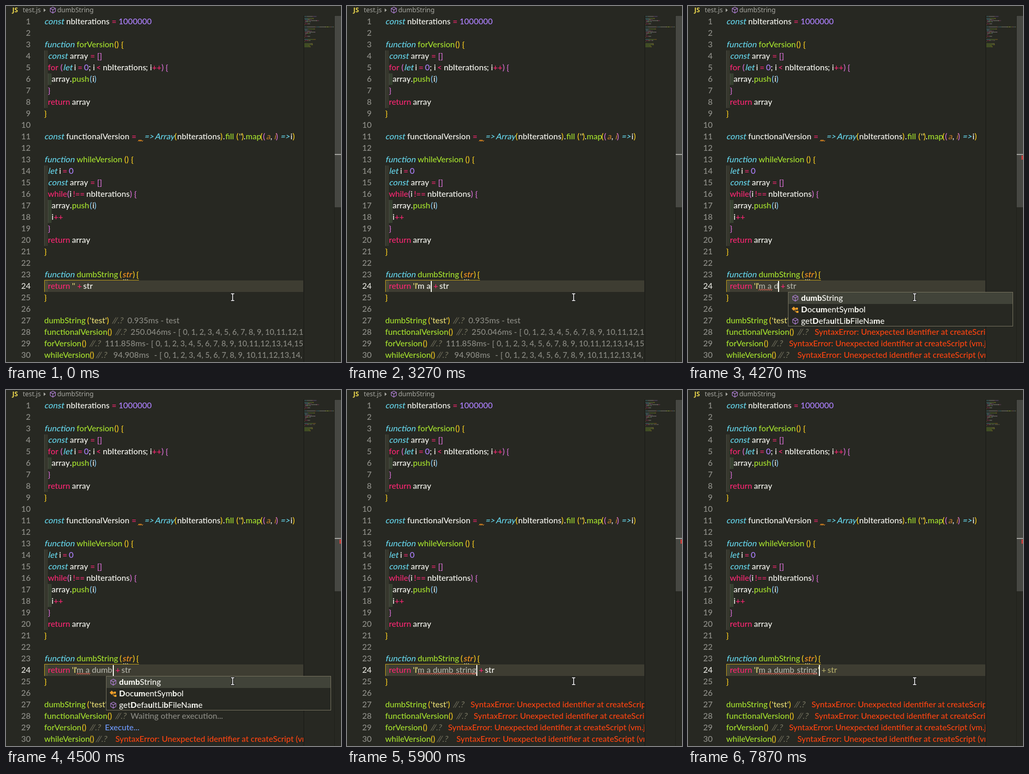
Recreate the animation shown at these times as an HTML page. Size 640 px wide and 681 px high, loop 8000 ms.

```html
<!DOCTYPE html>
<html lang="en">
<head>
<meta charset="utf-8">
<title>Code editor</title>
<style>
html, body { margin: 0; width: 100%; height: 100%; overflow: hidden; background: #272822; }
svg { display: block; width: 640px; height: 681px; }
text { font: 500 15.6px Lato, "Open Sans", sans-serif; white-space: pre; fill: #f8f8f2; }
.crumb { font: 12.4px "Noto Sans", "Open Sans", sans-serif; fill: #a9a9a3; }
.num { text-anchor: end; fill: #90908a; }
.now { fill: #e4e4de; }
.w { fill: #f8f8f2; }
.k { fill: #f92672; }
.c { fill: #66d9ef; }
.f { fill: #a6e22e; }
.n { fill: #ae81ff; }
.s { fill: #e6db74; }
.a { fill: #fd971f; }
.d { fill: #b9792a; }
.y { fill: #ffd21f; }
.o { fill: #da70d6; }
.b { fill: #87cefa; }
.g { fill: #74725f; }
.dim { fill: #b4b4ab; }
.rose { fill: #b52c5c; }
.tan { fill: #b3ac68; }
.time { fill: #8b8b84; }
.items { fill: #8b8b84; font-size: 15px; }
.run { fill: #6f9bff; }
.fail { fill: #ff4410; }
.pop tspan { font-weight: 800; }
</style>
</head>
<body>
<svg viewBox="0 0 640 681" xmlns="http://www.w3.org/2000/svg">
  <defs><clipPath id="pane"><rect width="569.5" height="681"/></clipPath></defs>
  <rect width="640" height="681" fill="#272822"/>

  <text class="crumb" x="12" y="12" style="font-weight:700;fill:#e8d44d">JS</text>
  <text class="crumb" x="32" y="12">test.js</text>
  <path d="M72 4.5 L76 8 L72 11.5Z" fill="#a9a9a3"/>
  <g id="cube" fill="none" stroke="#b180d7" stroke-width="1.1">
    <path d="M89.5 2 L94.5 4.5 V10.5 L89.5 13.5 L84.5 10.5 V4.5Z M84.5 4.5 L89.5 7.3 L94.5 4.5 M89.5 7.3 V13.5"/>
  </g>
  <text class="crumb" x="98" y="12">dumbString</text>

  <g clip-path="url(#pane)">
    <rect x="73" y="525" width="497" height="22" fill="#3e3d32"/>
    <g id="indent"></g>
    <path d="M254 524.5 H73.5 V547" fill="none" stroke="#b99a1c"/>
    <g id="code"></g>
    <path d="M252 259 l2 -2 2 2 2 -2 2 2 2 -2" fill="none" stroke="#fd971f"/>
    <path d="M224 523.5 H234" stroke="#c9c9c0" stroke-width="1.4" stroke-dasharray="1.5 2.2"/>
    <g id="out"></g>
    <g id="edit"></g>
    <path id="wave" fill="none" stroke="#ff6a5c"/>
    <rect id="caret" y="526" width="2" height="21" fill="#f8f8f0"/>
  </g>

  <rect x="568" y="18" width="2" height="663" fill="#1f201b"/>
  <g id="map" opacity=".4"></g>
  <g id="mapEdit" opacity=".4"></g>
  <rect x="627" y="18" width="1" height="663" fill="#1f201b"/>
  <rect x="628" y="19" width="12" height="366" fill="#474843"/>
  <rect x="628" y="283" width="12" height="2" fill="#a3a39e"/>
  <rect id="mark" x="637" y="286" width="3" height="8" fill="#c5403c"/>

  <g id="pop" class="pop">
    <rect x="191.5" y="547.5" width="429" height="65" fill="#272822" stroke="#75715e"/>
    <rect x="192" y="548" width="428" height="22" fill="#414339"/>
    <use href="#cube" x="115.5" y="551"/>
    <g fill="#ee9d28">
      <path d="M198 579 l4 -4 4 4 -4 4z M206 577 h4 v4 h-4z M207 583 h4 v4 h-4z"/>
      <path d="M204 579 h4 M205 580 v5 h4" stroke="#ee9d28" fill="none"/>
    </g>
    <use href="#cube" x="115.5" y="595"/>
    <text x="216" y="564"><tspan>dumb</tspan>String</text>
    <text x="216" y="586"><tspan>D</tspan>oc<tspan>um</tspan>entSym<tspan>b</tspan>ol</text>
    <text x="216" y="608">get<tspan>D</tspan>efa<tspan>u</tspan>ltLi<tspan>b</tspan>FileNa<tspan>m</tspan>e</text>
  </g>

  <g fill="none" stroke-linecap="square">
    <path d="M430.5 550.5 H435.5 M433 551 V563 M430.5 563.5 H435.5" stroke="#111" stroke-width="3.4"/>
    <path d="M430.5 550.5 H435.5 M433 551 V563 M430.5 563.5 H435.5" stroke="#fff" stroke-width="1.5"/>
  </g>
</svg>
<script>
const $ = id => document.getElementById(id);
const base = line => 22 * line + 13;
const esc = s => s.replace(/&/g, '&amp;').replace(/</g, '&lt;');
// Slanted classes lean the upright letters
const slant = cls => 'cadg'.includes(cls) ? ' skewX(-12)' : '';
const txt = (x, line, cls, s) =>
  `<text transform="translate(${x} ${base(line)})${slant(cls)}" class="${cls}">${esc(s)}</text>`;
const rect = (x, y, w, h, attr) => `<rect x="${x}" y="${y}" width="${w}" height="${h}" ${attr}/>`;
const mini = (x, line, cls, s) =>
  rect(570 + (x - 73) * 0.117, 17.5 + 2 * line, s.length * 0.95, 1, `class="${cls}"`);

// Each token: x, class, text
const push = '87 w array|122 w .|126 f push|160 b (|165 w i|168.5 b )';
const list = '80 c const|122 w array|161 k =|174 o []';
const back = '80 k return|126 w array';
const code = {
  1: '73 c const|115 w nbIterations|202 k =|215 n 1000000',
  3: '73 c function|135 f forVersion|207 y ()|220 y {',
  4: list,
  5: '80 k for|104 o (|109 c let|130 w i|137 k =|149 n 0|158 w ;|166 w i|172.5 k <|185 w nbIterations|267 w ;|275 w i|279 k ++|297 o )|305 o {',
  6: push,
  7: '80 o }',
  8: back,
  9: '73 y }',
  11: '73 c const|115 w functionalVersion|240 k =|253 a _|264 c =>|284 c Array|322 y (|327 w nbIterations|409.5 y )|414.5 w .|419 f fill|440 y (|445 s \'\'|450 y )|454 w .|458 f map|486 y (|491 o (|497 d a|505 w ,|512 d i|515.5 o )|524 c =>|543.5 w i|547.5 y )',
  13: '73 c function|135 f whileVersion|226 y ()|239 y {',
  14: '80 c let|101.5 w i|108 k =|120 n 0',
  15: list,
  16: '80 k while|117 o (|121.5 w i|128 k !==|153.5 w nbIterations|236.5 o )|245 o {',
  17: push,
  18: '87 w i|91 k ++',
  19: '80 o }',
  20: back,
  21: '73 y }',
  23: '73 c function|135 f dumbString|217 y (|222 a str|242 y )|249 y {',
  24: '80 k return',
  25: '73 y }',
  27: '73 f dumbString|155 y (|160 s \'test\'|192.5 y )|202 g //.?',
  28: '73 f functionalVersion|194 y ()|208 g //.?',
  29: '73 f forVersion|145 y ()|159 g //.?',
  30: '73 f whileVersion|160 y ()|171 g //.?'
};

let lines = '', map = '';
for (let n = 1; n <= 30; n++) {
  lines += `<text x="47" y="${base(n)}" class="num${n === 24 ? ' now' : ''}">${n}</text>`;
  for (const part of (code[n] || '').split('|').filter(Boolean)) {
    const [x, cls, s] = part.split(' ');
    lines += txt(+x, n, cls, s);
    if (cls !== 'g') map += mini(+x, n, cls, s);
  }
}
$('code').innerHTML = lines;
$('map').innerHTML = map;

const shade = (x, from, to, fill) => {
  const y = 22 * from - 3, h = 22 * (to - from + 1);
  return rect(x, y, 7, h, `fill="${fill}"`) + rect(x, y, 1, h, 'fill="#494a42"');
};
$('indent').innerHTML = shade(73, 4, 8, '#36372d') + shade(73, 14, 20, '#36372d') +
  shade(73, 24, 24, '#4a4935') + shade(80, 6, 6, '#364030') + shade(80, 17, 18, '#364030');

// Typing: time, literal, right edge
const typed = [
  [0, "''", 132], [1800, "'I'", 135.5], [2500, "'I'm", 148], [2770, "'I'm ", 152],
  [3270, "'I'm a", 161], [3370, "'I'm a ", 164], [4270, "'I'm a d", 173],
  [4330, "'I'm a du", 182], [4400, "'I'm a dum", 196], [4500, "'I'm a dumb", 205],
  [4900, "'I'm a dumb ", 209], [5230, "'I'm a dumb s", 216], [5500, "'I'm a dumb st", 221],
  [5570, "'I'm a dumb str", 227], [5670, "'I'm a dumb stri", 231], [5770, "'I'm a dumb strin", 240],
  [5900, "'I'm a dumb string", 248], [6070, "'I'm a dumb string ", 252],
  [6870, "'I'm a dumb string", 248], [7670, "'I'm a dumb string'", 251]
];
// Results: v value, E executing, w waiting, x failed
const runs = [
  [0, 'vvvv'], [3430, 'Ewww'], [3570, 'xwwE'], [3630, 'xwEx'], [3700, 'xExx'], [3830, 'xxxx'],
  [4500, 'xwEx'], [4600, 'xExx'], [4700, 'xxxx'],
  [6400, 'Ewww'], [6670, 'xEww'], [6730, 'xxEw'], [6800, 'xxxE'], [6870, 'xxxx']
];
const tails = [
  [0, 'k', 'w'], [3570, 'rose', 'w'], [4270, 'k', 'dim'], [5230, 'k', 'w'],
  [6400, 'rose', 'dim'], [7670, 'tan', 'tan']
];
const waves = [[0, 135], [3570, 148], [4270, 161], [4900, 204], [5900, 248]];
const carets = [
  [0, 0], [30, 1], [570, 0], [1300, 1], [1570, 0], [2270, 1], [6500, 0], [6870, 1]
];
const at = (table, t) => table.filter(row => row[0] <= t).pop();

const edge = [232, 238, 189, 205];
const took = ['0.935ms - test', '250.046ms', '111.858ms', '94.908ms'];
const first = [0, 338, 286, 302];
const fail = 'SyntaxError: Unexpected identifier at createScript (vm.js:80:10)';

function value(i) {
  const line = 27 + i, x = first[i];
  let s = txt(edge[i], line, 'time', took[i]);
  if (!x) return s;
  s += txt(x - 19, line, 'time', '-') + txt(x - 9, line, 'time', '[');
  for (let k = 0; k < 17; k++) {
    s += txt(x + Math.min(k, 10) * 15.7 + Math.max(k - 10, 0) * 21.5, line, 'items', k + ',');
  }
  return s;
}
function result(kind, i) {
  if (kind === 'v') return value(i);
  if (kind === 'E') return txt(edge[i], 27 + i, 'run', 'Execute...');
  if (kind === 'w') return txt(edge[i], 27 + i, 'time', 'Waiting other execution...');
  return txt(edge[i] + 4, 27 + i, 'fail', fail);
}

function literal(t) {
  const [, s, end] = at(typed, t);
  const [, plus, name] = at(tails, t);
  const parts = [[126, 's', "'"]];
  if (s.length < 3) parts.push([129, 's', "'"]);
  else parts.push([129.2, 's', 'I'], [132.5, 's', "'"]);
  const spots = [135, 152, 164, 208];
  const closed = s.endsWith("g'");
  const body = s.slice(3, closed ? -1 : undefined);
  const tone = t < 3570 ? 'w' : 'dim';
  body.split(' ').forEach((word, i) => {
    if (!word) return;
    if (i === 3 && t < 5900) {
      parts.push([208, tone, 's']);
      if (word.length > 1) parts.push([215.3, 'w', word.slice(1)]);
    } else parts.push([spots[i], tone, word]);
  });
  if (closed) parts.push([248, 's', "'"]);
  parts.push([end + 4, plus, '+'], [end + 15.5, name, 'str']);
  return parts;
}

function wave(t) {
  const end = at(waves, t)[1];
  let d = 'M135 544';
  for (let x = 137, up = 1; x <= end; x += 2, up = !up) d += ` L${x} ${up ? 541.5 : 544}`;
  return end > 135 ? d : '';
}

let shown = -1;
function draw(t) {
  // Every change falls on a 10 ms step
  const step = Math.floor(t / 10);
  if (step === shown) return;
  shown = step;
  const parts = literal(t);
  $('edit').innerHTML = parts.map(([x, cls, s]) => txt(x, 24, cls, s)).join('');
  $('mapEdit').innerHTML = parts.map(([x, cls, s]) => mini(x, 24, cls, s)).join('');
  $('out').innerHTML = [...at(runs, t)[1]].map(result).join('');
  $('wave').setAttribute('d', wave(t));
  const end = at(typed, t)[2];
  $('caret').setAttribute('x', t < 1800 ? 128 : end - 1);
  $('caret').style.opacity = at(carets, t)[1];
  $('mark').style.opacity = t >= 3570 ? 1 : 0;
  $('pop').style.display = t >= 4270 && t < 4900 ? '' : 'none';
}

const start = performance.now();
function tick() {
  draw((performance.now() - start) % 8000);
  requestAnimationFrame(tick);
}
tick();
</script>
</body>
</html>
```
